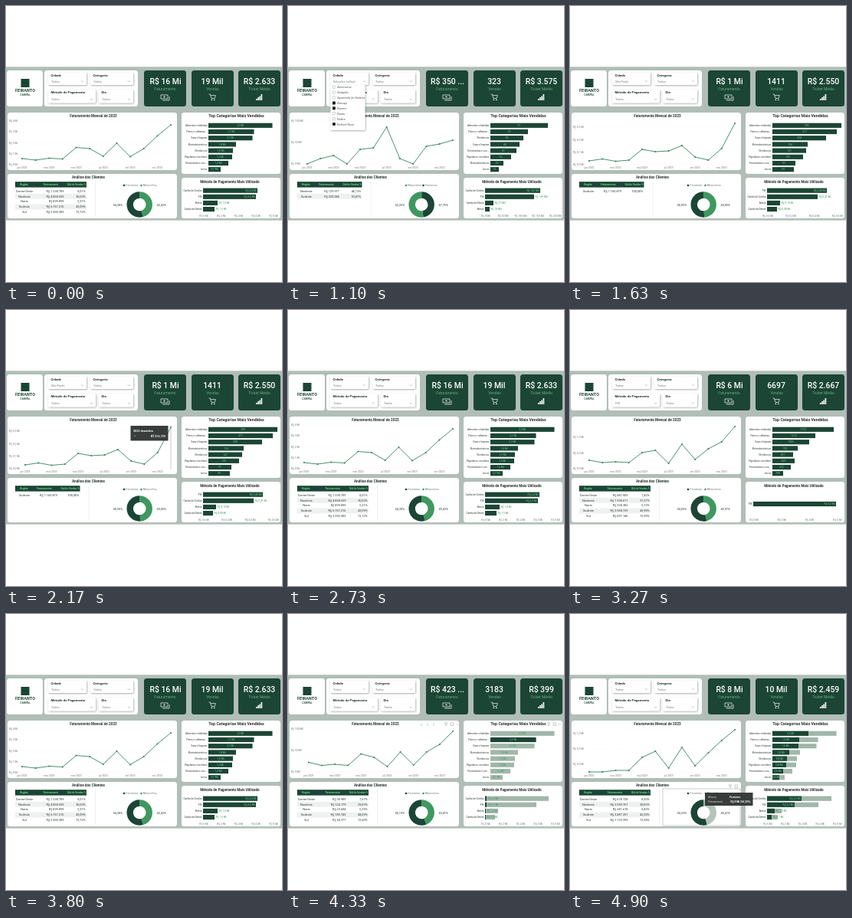
An HTML page for the animation above (5430 ms loop, 360x360 px).

```html
<!DOCTYPE html>
<html lang="pt-BR">
<head>
<meta charset="utf-8">
<title>Painel de vendas</title>
<style>
html, body { margin: 0; width: 100%; height: 100%; overflow: hidden; background: #fff; }
svg { display: block; width: 100vw; height: 100vh; }
text { font-family: Roboto, "Open Sans", sans-serif; white-space: pre; }
</style>
</head>
<body>
<svg id="stage" viewBox="0 0 360 360">
  <defs>
    <filter id="soft" x="-10%" y="-20%" width="120%" height="150%">
      <feDropShadow dx="0.7" dy="0.9" stdDeviation="0.9" flood-color="#52605a" flood-opacity="0.55"/>
    </filter>
  </defs>
  <g id="base"></g>
  <g id="view"></g>
</svg>
<script>
const DARK = '#1b4535', GREEN = '#3f9860', LIME = '#72cf8c', PALE = '#a2b7ab';
const INK = '#26332d', GRAY = '#737b77', SAGE = '#b1beb7', TIP = '#383c3a';
const LOOP = 5430;

// ---- drawing helpers ----
const rect = (x, y, w, h, fill, extra = '') =>
  `<rect x="${x}" y="${y}" width="${w}" height="${h}" fill="${fill}" ${extra}/>`;
const text = (x, y, s, size, fill = INK, anchor = 'start', weight = 400) =>
  `<text x="${x}" y="${y}" font-size="${size}" fill="${fill}" text-anchor="${anchor}" font-weight="${weight}">${s}</text>`;
const path = (d, stroke, width = 0.7, extra = '') =>
  `<path d="${d}" fill="none" stroke="${stroke}" stroke-width="${width}" ${extra}/>`;
const dot = (x, y, r, fill) => `<circle cx="${x}" cy="${y}" r="${r}" fill="${fill}"/>`;
const panel = (x, y, w, h, fill = '#fff') => rect(x, y, w, h, fill, 'rx="3.5"');
const each = (list, draw) => list.map(draw).join('');
const words = s => s.split('|');

// ---- scene data ----
const CAT = { A: 'Alimentos e bebidas', F: 'Flores e colheitas...', C: 'Casa e limpeza', D: 'Eletrodomésticos',
  E: 'Eletrônicos', P: 'Papelaria e escritório', T: 'Ferramentas e con...', L: 'Livros' };
const PAY = { C: 'Cartão de Crédito', P: 'PIX', B: 'Boleto', D: 'Cartão de Débito' };
const REGIONS = words('Centro-Oeste|Nordeste|Norte|Sudeste|Sul');
const MONTHS = words('jan|mar|mai|jul|set|nov');
const CITIES = words('Americana|Anápolis|Aparecida de Goiânia|Aracaju|Barueri|Bauru|Belém|Belford Roxo');
const PICKED = [3, 4, 7];

const all = {
  cards: words('R$ 16 Mi|19 Mil|R$ 2.633'),
  x0: 21,
  line: [199, 201, 198.5, 199.5, 184.5, 186, 196, 179, 196.5, 186, 169.5, 155],
  yAxis: words('R$ 4 Mi|R$ 3 Mi|R$ 2 Mi|R$ 1 Mi|R$ 0 Mi'), yTop: 150, yEnd: 207,
  cats: 'AFCDEPTL', catEnds: [347.5, 323.5, 321.5, 300, 296, 295, 290, 280],
  catVals: words('3,9 Mi|2,7 Mi|2,7 Mi|1,8 Mi|1,5 Mi|1,5 Mi|1,2 Mi|0,7 Mi'),
  pays: 'CPBD', payEnds: [328, 326, 276, 272], inside: 2,
  payVals: words('R$ 6,4 Mi|R$ 6,2 Mi|R$ 1,8 Mi|R$ 1,5 Mi'),
  payAxis: words('R$ 0 Mi|R$ 2 Mi|R$ 4 Mi|R$ 6 Mi|R$ 8 Mi'),
  regions: REGIONS, tableEnd: 104.5,
  money: words('1.330.709|4.868.659|899.099|6.761.216|2.302.283'),
  share: words('8,01%|30,03%|5,31%|43,09%|13,12%'),
  left: '54,38%', right: '45,62%'
};

const several = { ...all,
  cards: words('R$ 350 ...|323|R$ 3.575'), city: 'Seleções múltipl...', menu: true, x0: 25,
  line: [206, 199, 195, 206, 187, 185, 158, 199, 206, 183, 180, 175],
  yAxis: words('R$ 100 Mil|R$ 50 Mil|R$ 0 Mil'), yEnd: 206,
  cats: 'AFECTPDL', catEnds: [339, 313, 307, 302, 298, 291, 281, 275],
  catVals: words('91|58|52|45|41|32|20|13'),
  pays: 'CPDB', payEnds: [329, 321, 268, 263], inside: 1,
  payVals: words('R$ 156 Mil|R$ 149 Mil|R$ 27 Mil|R$ 18 Mil'),
  payAxis: words('R$ 0 Mil|R$ 50 Mil|R$ 100 Mil|R$ 150 Mil|R$ 200 Mil'),
  regions: ['Nordeste', 'Sudeste'], tableEnd: 96,
  money: words('129.971|220.046'), share: words('46,13%|53,87%'),
  left: '52,25%', right: '47,75%', swap: true
};

const oneCity = { ...all,
  cards: words('R$ 1 Mi|1411|R$ 2.550'), city: 'São Paulo', x0: 25,
  line: [202, 199.5, 202.5, 201, 187, 190, 189, 182, 197, 201, 186, 153],
  yAxis: words('R$ 0,3 Mi|R$ 0,2 Mi|R$ 0,1 Mi|R$ 0,0 Mi'), yTop: 158, yEnd: 207,
  cats: 'AFCDEPTL', catEnds: [354, 348, 334, 310, 308, 304, 294, 292],
  catVals: words('295|277|230|154|141|132|97|93'),
  pays: 'PCBD', payEnds: [335, 323, 274, 270], inside: 1,
  payVals: words('R$ 0,48 Mi|R$ 0,41 Mi|R$ 0,10 Mi|R$ 0,08 Mi'),
  payAxis: words('R$ 0,0 Mi|R$ 0,2 Mi|R$ 0,4 Mi|R$ 0,6 Mi'),
  regions: ['Sudeste'], tableEnd: 96, money: ['1.160.879'], share: ['100,00%'],
  left: '50,95%', right: '49,05%'
};

const pixOnly = { ...all,
  cards: words('R$ 6 Mi|6697|R$ 2.667'), method: 'PIX', x0: 25,
  line: [196, 199, 198, 199, 186, 183, 200, 175, 195, 181, 172, 152],
  yAxis: words('R$ 1,0 Mi|R$ 0,5 Mi|R$ 0,0 Mi'), yTop: 166, yEnd: 207,
  catEnds: [344, 320, 312, 297, 291, 293, 288, 278],
  catVals: words('1753|1212|1085|722|601|629|522|298'),
  pays: 'P', payEnds: [347], inside: 1, payVals: ['R$ 6,2 Mi'],
  payAxis: words('R$ 0 Mi|R$ 2 Mi|R$ 4 Mi|R$ 6 Mi'),
  money: words('487.509|1.938.611|338.382|2.584.739|897.146'),
  share: words('7,42%|31,57%|5,12%|42,98%|12,90%'),
  left: '54,03%', right: '45,97%'
};

const oneCategory = { ...all,
  cards: words('R$ 423 ...|3183|R$ 399'), x0: 27, tools: true,
  line: [193.5, 197.5, 196, 197.5, 182.5, 187, 199, 180, 197, 180, 170, 153],
  yAxis: words('R$ 100 Mil|R$ 50 Mil|R$ 0 Mil'), yEnd: 206,
  catLit: [264, 323.5, 264, 264, 264, 264, 264, 264],
  payEnds: [340, 324, 274, 270], payLit: [259, 259, 258, 258], nearStart: true,
  money: words('30.909|124.179|23.684|185.743|54.377'),
  share: words('7,67%|29,69%|5,35%|44,69%|12,60%'),
  left: '56,19%', right: '43,81%'
};

const women = { ...all,
  cards: words('R$ 8 Mi|10 Mil|R$ 2.459'), x0: 25, focus: true,
  line: [206, 206, 204, 204, 187, 179, 201, 174, 198, 181, 165, 151],
  yAxis: words('R$ 1,0 Mi|R$ 0,5 Mi|R$ 0,0 Mi'), yTop: 156, yEnd: 196,
  catLit: [311, 299, 298, 286, 283, 282, 278, 273],
  catVals: words('2,2 Mi|1,5 Mi|1,5 Mi|1,0 Mi|0,8 Mi|0,8 Mi|0,6 Mi|0,4 Mi'),
  payEnds: [341, 324, 276, 271], payLit: [302, 293, 267, 263],
  payVals: words('R$ 3,5 Mi|R$ 3,2 Mi|R$ 1,0 Mi|R$ 0,7 Mi'),
  money: words('678.728|2.589.767|381.618|3.487.251|1.133.392'),
  share: words('8,50%|30,83%|5,43%|42,20%|12,94%'),
  left: '54,33%', right: '45,67%'
};

const timeline = [
  [0, all], [1100, several], [1630, oneCity], [2170, { ...oneCity, hover: true }], [2730, all],
  [3270, pixOnly], [3800, all], [4330, oneCategory], [4900, women]
];

// ---- fixed parts ----
function drawBase() {
  const icons = path('M202 116h9v5h-9zM204 123h9v-5', '#dfe9e3', 0.8) + dot(206.5, 118.5, 1.1, '#dfe9e3') +
    path('M264.5 115h1.8l1.6 5.4h4.3l1.2-3.8h-6.5', '#dfe9e3', 0.8) + dot(268.4, 122.4, 0.8, '#fff') + dot(271.8, 122.4, 0.8, '#fff') +
    each([2, 4, 5.5, 8], (h, i) => rect(326 + i * 2.2, 123 - h, 1.6, h, '#fff'));
  return rect(0, 79.3, 360, 200.3, SAGE) +
    panel(1, 84, 47, 47) + panel(50, 84, 122, 47) +
    rect(19.5, 95, 11, 11, DARK) +
    text(25, 112.3, 'FEIRANTO', 5.5, DARK, 'middle', 700) +
    text(25, 116.6, 'CAMPAL', 3.4, DARK, 'middle', 500) +
    each([180, 242, 303], (x, i) =>
      panel(x, 84, 55, 47, DARK) +
      text(x + 27.5, 109.5, ['Faturamento', 'Vendas', 'Ticket Médio'][i], 5, '#69aa80', 'middle')) +
    icons +
    panel(2, 139, 221, 75) + panel(2, 219, 221, 58) + panel(229, 139, 129, 80) + panel(229, 224, 129, 53) +
    text(114, 145, 'Faturamento Mensal de 2023', 4.7, INK, 'middle', 700) +
    text(300.5, 145, 'Top Categorias Mais Vendidas', 5.3, INK, 'middle', 700) +
    text(107.5, 225, 'Análise dos Clientes', 4.7, INK, 'middle', 700) +
    text(292, 230.7, 'Método de Pagamento Mais Utilizado', 4.6, INK, 'middle', 700);
}

// ---- parts that follow the scene ----
function slicer(x, y, w, h, label, value = 'Todos') {
  return rect(x, y, w, h, '#fff', 'rx="1.5" filter="url(#soft)"') +
    text(x + 3.5, y + 5, label, 4.4, INK, 'start', 700) +
    text(x + 4, y + h - 3.5, value, 3.9, GRAY) +
    path(`M${x + w - 7} ${y + h - 5.6}l1.4 1.4l1.4-1.4`, GRAY, 0.5);
}

function cityMenu() {
  return rect(55.5, 103, 45, 59, '#fff', 'filter="url(#soft)"') + each(CITIES, (name, i) => {
    const y = 105.8 + i * 6.9, on = PICKED.includes(i);
    return rect(58.3, y - 1.7, 3.4, 3.4, on ? '#111' : '#fff', `stroke="${on ? '#111' : '#999'}" stroke-width="0.4"`) +
      text(64.3, y + 1.4, name, 3.8, '#4f5753');
  });
}

function lineChart(s) {
  const step = (215 - s.x0) / 11, px = i => s.x0 + i * step;
  const gap = (s.yEnd - s.yTop) / (s.yAxis.length - 1);
  return each(s.yAxis, (label, i) => {
    const y = s.yTop + i * gap;
    return path(`M${s.x0 - 2} ${y}H219`, '#dce1de', 0.4, 'stroke-dasharray="0.5 1.5"') + text(4, y + 1.2, label, 3.4, GRAY);
  }) +
    each(MONTHS, (m, i) => text(px(i * 2), 212, m + ' 2023', 3.4, GRAY, 'middle')) +
    path('M' + s.line.map((y, i) => `${px(i)} ${y}`).join('L'), '#4a9170', 1, 'stroke-linejoin="round"') +
    each(s.line, (y, i) => dot(px(i), y, 1.05, '#3d7c60'));
}

function bars(ends, lit, x, y0, pitch, h, label) {
  return each(ends, (end, i) => {
    const y = y0 + i * pitch;
    return rect(x, y - h / 2, end - x, h, lit ? PALE : DARK) +
      (lit ? rect(x, y - h / 2, lit[i] - x, h, DARK) : '') + label(i, y, end);
  });
}

function categories(s) {
  return bars(s.catEnds, s.catLit, 264, 155.8, 8.2, 6.2, (i, y, end) => {
    const lit = s.catLit ? s.catLit[i] : end, shown = lit > 264;
    return text(262, y + 1.1, CAT[s.cats[i]], 3.1, INK, 'end') +
      text((264 + (shown ? lit : end)) / 2, y + 1.2, s.catVals[i], 3.4, shown ? LIME : GREEN, 'middle');
  });
}

function payments(s) {
  const solo = s.pays.length === 1, x = solo ? 239 : 257, gap = (solo ? 109 : 91) / (s.payAxis.length - 1);
  return bars(s.payEnds, s.payLit, x, solo ? 253 : 240.7, 8.1, 6.2, (i, y, end) => {
    const lit = s.payLit ? s.payLit[i] : end;
    const within = i < s.inside && !s.nearStart;
    return text(x - 1.5, y + 1.1, PAY[s.pays[i]], 3.1, INK, 'end') +
      text(within ? lit - 1.5 : lit + 1.5, y + 1.2, s.payVals[i], 3.4, within ? LIME : GREEN, within ? 'end' : 'start');
  }) + each(s.payAxis, (label, i) => text(x + 1 + i * gap, 275, label, 3.4, GRAY, 'middle'));
}

function table(s) {
  const end = s.tableEnd, mid = end - 29;
  return path(`M${end + 12} 229V275`, '#e3e8e5', 0.6) +
    rect(12, 229.2, end - 11.5, 7.4, DARK) +
    text(23.5, 234.1, 'Região', 3.4, LIME, 'middle', 700) +
    text(mid - 17, 234.1, 'Faturamento', 3.4, LIME, 'middle', 700) +
    text(end - 0.5, 234.1, 'Qtd de Vendas %', 3.2, LIME, 'end', 700) +
    each(s.regions, (name, i) => {
      const y = 241.2 + i * 6.9;
      return (i % 2 ? rect(12, y - 3.4, end - 11.5, 6.9, '#eef1ef') : '') +
        text(24, y + 1.4, name, 3.9, INK, 'middle') +
        text(mid, y + 1.4, 'R$ ' + s.money[i], 3.9, INK, 'end') +
        text(end - 1, y + 1.4, s.share[i], 3.9, INK, 'end');
    });
}

function donut(s) {
  const cx = 174.2, cy = 259, r = 12.5;
  const part = parseFloat(s.right.replace(',', '.')) / 100 * 2 * Math.PI;
  const ex = cx + r * Math.sin(part), ey = cy - r * Math.cos(part);
  const arc = (x1, y1, big, x2, y2, color) =>
    path(`M${x1} ${y1}A${r} ${r} 0 ${big} 1 ${x2} ${y2}`, color, 8.4);
  const main = s.swap ? GREEN : DARK, other = s.focus ? '#b3c4ba' : s.swap ? DARK : GREEN;
  const names = s.swap ? ['Masculino', 'Feminino'] : ['Feminino', 'Masculino'];
  return (s.focus ? rect(121, 228, 101, 48, '#fff', 'stroke="#555" stroke-width="0.5" stroke-dasharray="1 0.7"') : '') +
    arc(cx, cy - r, 0, ex, ey, other) + arc(ex, ey, 1, cx, cy - r, main) +
    each(names, (name, i) => dot(154 + i * 22.5, 234, 1.3, i ? other : main) + text(156.3 + i * 22.5, 235.4, name, 3.9, GRAY)) +
    text(152, 261, s.left, 3.9, INK, 'end') + text(196.5, 261, s.right, 3.9, INK);
}

const tools = (x, y) => path(`M${x} ${y}h4l-1.6 1.8v2l-.8-.5v-1.5zM${x + 8} ${y}h3.6v3.6h-3.6z`, '#8a938e', 0.45) +
  each([0, 1.5, 3], d => dot(x + 15 + d, y + 2, 0.4, '#8a938e'));

function overlays(s) {
  let out = '';
  if (s.menu) out += cityMenu();
  if (s.hover) out += path('M215 150V207', '#8b938f', 0.5) + rect(162.5, 151, 49, 19.5, TIP) +
    text(166, 159, '2023 dezembro', 3.7, '#fff', 'start', 700) +
    dot(168, 164.3, 1, GREEN) + text(208, 165.6, 'R$ 316.739', 3.7, '#fff', 'end', 700);
  if (s.tools) out += tools(204, 142) + tools(338, 142) +
    each([174, 182, 190], x => path(`M${x} 142v3.6m-1.3-1.3l1.3 1.3l1.3-1.3`, '#a3aaa6', 0.4));
  if (s.focus) out += tools(207, 223) + rect(176, 233, 62.5, 17, TIP) +
    text(180, 240.3, 'Gênero', 3.4, '#ddd') + text(208, 240.3, 'Feminino', 3.4, '#fff', 'start', 700) +
    text(180, 246.3, 'Faturamento', 3.4, '#ddd') + text(235.5, 246.3, 'R$ 8 Mi (54,33%)', 3.4, '#fff', 'end', 700);
  return out;
}

function drawScene(s) {
  return slicer(55, 86.5, 50, 16.5, 'Cidade', s.city) + slicer(110, 86.5, 56, 16.5, 'Categoria') +
    slicer(55, 109, 62, 17.5, 'Método de Pagamento', s.method) + slicer(121, 109, 45, 17.5, 'Dia') +
    each(s.cards, (v, i) => text([208, 269, 330.5][i], 101.5, v, 10.4, '#fff', 'middle', 500)) +
    lineChart(s) + categories(s) + payments(s) + table(s) + donut(s) + overlays(s);
}

// ---- playback ----
const view = document.getElementById('view');
document.getElementById('base').innerHTML = drawBase();
let current;

function render(ms) {
  const t = ms % LOOP;
  const scene = timeline.filter(([start]) => start <= t).pop()[1];
  if (scene === current) return;
  current = scene;
  view.innerHTML = drawScene(scene);
}

const begin = performance.now();
function tick() {
  render(performance.now() - begin);
  requestAnimationFrame(tick);
}
tick();
</script>
</body>
</html>
```
